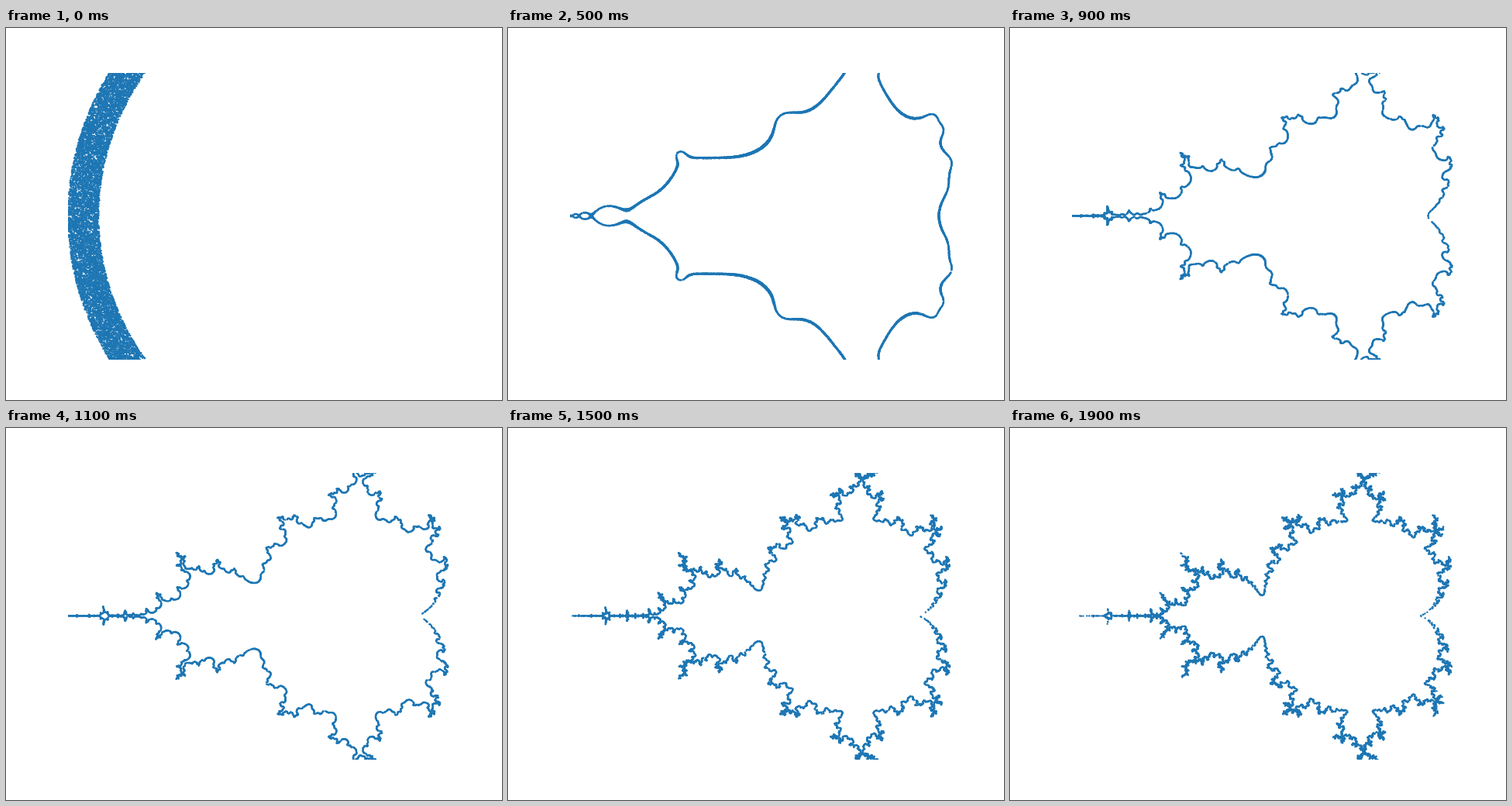
These frames come from a looping animation (640 by 480 pixels, 2000 ms). An HTML page with a canvas:

```html
<!DOCTYPE html>
<html lang="en">
<head>
<meta charset="utf-8">
<title>Lemniscates</title>
<style>
  html, body { margin: 0; width: 100%; height: 100%; overflow: hidden; background: #fff; }
  canvas { display: block; }
</style>
</head>
<body>
<canvas id="stage" width="640" height="480"></canvas>
<script>
const ctx = document.getElementById('stage').getContext('2d');

const STEPS = 20, STEP_MS = 100;
const BOX = { x: 80, y: 57.6, w: 496, h: 369.6 };
const SCALE_X = BOX.w / 2.5, SCALE_Y = BOX.h / 2;   // real -2..0.5, imaginary -1..1
const SPACING = 0.5, DOT = 1.2, REACH = 0.22, MARGIN = 2;
const ESCAPED = 1e20;

function makeRandom(seed) {
  return () => {
    seed = (seed + 0x6D2B79F5) | 0;
    let t = Math.imul(seed ^ (seed >>> 15), 1 | seed);
    t = (t + Math.imul(t ^ (t >>> 7), 61 | t)) ^ t;
    return ((t ^ (t >>> 14)) >>> 0) / 4294967296;
  };
}
const random = makeRandom(7);

// dots[n] holds x, y pairs of samples where |z_n| lies in the ring 1.8..2
const dots = Array.from({ length: STEPS + 1 }, () => []);

// Early rings are wide and grainy; late ones thin out towards the cusp at 1/4.
function chance(n, re, im) {
  return n < 8 ? Math.min(1, 0.15 * n) : Math.min(1, 5 * Math.hypot(re - 0.25, im));
}

// Iterates z = z² + c with its derivative and files the sample under each matching step.
function classify(x, y) {
  const re = (x - BOX.x) / SCALE_X - 2;
  const im = 1 - (y - BOX.y) / SCALE_Y;
  let zr = re, zi = im, dr = 1, di = 0;
  for (let n = 1; n <= STEPS; n++) {
    const size2 = zr * zr + zi * zi;
    if (size2 > ESCAPED) return;
    if (size2 > 1.44) {
      const size = Math.sqrt(size2);
      const inRing = size > 1.8 && size < 2;
      const distance = 190 * size * Math.abs(Math.log(size / 1.9)) / Math.hypot(dr, di);
      if ((inRing || distance < REACH) && random() < chance(n, re, im)) dots[n].push(x, y);
    }
    const nextDr = 2 * (zr * dr - zi * di) + 1;
    di = 2 * (zr * di + zi * dr);
    dr = nextDr;
    zi = 2 * zr * zi + im;
    zr = 2 * zr * zr - size2 + re;
  }
}

for (let y = BOX.y - MARGIN; y < BOX.y + BOX.h + MARGIN; y += SPACING) {
  for (let x = BOX.x - MARGIN; x < BOX.x + BOX.w + MARGIN; x += SPACING) {
    classify(x + random() * SPACING, y + random() * SPACING);
  }
}

ctx.beginPath();
ctx.rect(80, 58, 497, 370);
ctx.clip();
ctx.fillStyle = '#1f77b4';

function draw(n) {
  ctx.clearRect(0, 0, 640, 480);
  const points = dots[n];
  for (let i = 0; i < points.length; i += 2) {
    ctx.beginPath();
    ctx.arc(points[i], points[i + 1], DOT, 0, 2 * Math.PI);
    ctx.fill();
  }
}

let shown = 1;
const start = performance.now();
function tick() {
  const elapsed = Math.max(0, performance.now() - start);
  const n = 1 + Math.floor(elapsed / STEP_MS) % STEPS;
  if (n !== shown) draw(shown = n);
  requestAnimationFrame(tick);
}
draw(shown);
requestAnimationFrame(tick);
</script>
</body>
</html>
```
